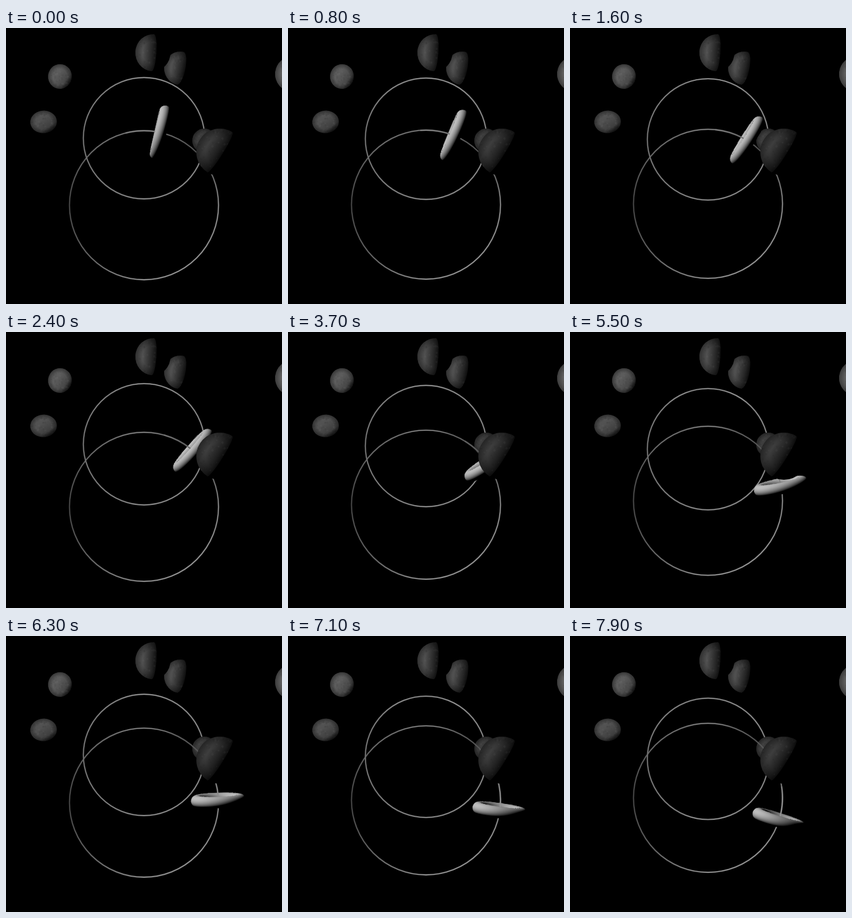
Recreate the animation shown at these times as an HTML page with a canvas. Size 480 by 480 pixels, loop 8000 ms.

```html
<!DOCTYPE html>
<html lang="en">
<head>
<meta charset="utf-8">
<title>Linked rings</title>
<style>
html, body { margin: 0; width: 100%; height: 100%; overflow: hidden; background: #000; }
canvas { display: block; }
</style>
</head>
<body>
<canvas id="stage" width="480" height="480"></canvas>
<script>
const ctx = document.getElementById('stage').getContext('2d');
const LOOP = 8000, STEP = 100, RAD = Math.PI / 180, TAU = Math.PI * 2;
const gray = (v, a = 1) => `rgba(${v},${v},${v},${a})`;

// Sphere: black disc, a lit side facing `dir` degrees, terminator bulging by `bulge`.
function moon(x, y, rx, ry, dir, bulge, bright, dim, seed) {
  ctx.save();
  ctx.translate(x, y);
  ctx.scale(1, ry / rx);
  ctx.fillStyle = '#000';
  ctx.beginPath();
  ctx.arc(0, 0, rx, 0, TAU);
  ctx.fill();
  ctx.rotate((dir + 180) * RAD);
  const fade = ctx.createLinearGradient(-rx, 0, rx * bulge, 0);
  fade.addColorStop(0, gray(bright));
  fade.addColorStop(0.35, gray(bright));
  fade.addColorStop(0.8, gray(dim));
  fade.addColorStop(1, gray(dim * 0.35));
  ctx.beginPath();
  ctx.arc(0, 0, rx, Math.PI / 2, Math.PI * 1.5);
  ctx.ellipse(0, 0, rx * bulge, rx, 0, -Math.PI / 2, Math.PI / 2);
  ctx.fillStyle = fade;
  ctx.fill();
  ctx.clip();
  const rnd = () => (seed = seed * 16807 % 2147483647) / 2147483647;
  for (let i = 0; i < 90; i++) {
    const a = rnd() * TAU, d = Math.sqrt(rnd()) * rx;
    ctx.fillStyle = gray(i % 2 ? 150 : 0, 0.06);
    ctx.beginPath();
    ctx.arc(d * Math.cos(a), d * Math.sin(a), 0.5 + rnd() * 1.7, 0, TAU);
    ctx.fill();
  }
  const limb = ctx.createRadialGradient(0, 0, rx * 0.6, 0, 0, rx);
  limb.addColorStop(0, gray(0, 0));
  limb.addColorStop(1, gray(0, 0.4));
  ctx.fillStyle = limb;
  ctx.fillRect(-rx, -rx, rx * 2, rx * 2);
  ctx.restore();
}

// Thin wire circle; tones are spread evenly clockwise from the right.
function wire(cy, r, tones, from = 0, to = TAU) {
  const shade = ctx.createConicGradient(0, 240, cy);
  tones.forEach((v, i) => shade.addColorStop(i / (tones.length - 1), gray(v)));
  ctx.strokeStyle = shade;
  for (const [width, alpha] of [[2.7, 0.45], [1.4, 1]]) {
    ctx.globalAlpha = alpha;
    ctx.lineWidth = width;
    ctx.beginPath();
    ctx.arc(240, cy, r, from, to);
    ctx.stroke();
  }
  ctx.globalAlpha = 1;
}

// Ray-marched torus: local x points outward, y along the wire, z to the viewer.
const W = 208, H = 64, R = 37.8, TUBE = 10;
const buffer = document.createElement('canvas');
buffer.width = W;
buffer.height = H;
const bctx = buffer.getContext('2d');
const image = bctx.createImageData(W, H);
const LIGHT = [-0.68, -0.6, 0.42];

function torus(cx, cy, angle, lean) {
  const sa = Math.sin(angle), ca = Math.cos(angle);
  const s = lean / R, c = Math.sqrt(1 - s * s);
  const lx = LIGHT[0] * sa - LIGHT[1] * ca, ly = LIGHT[0] * ca + LIGHT[1] * sa, lz = LIGHT[2];
  const dist = (x, y, z) => {
    const k = Math.sqrt(x * x + (y * s + z * c) ** 2) - R, b = y * c - z * s;
    return Math.sqrt(k * k + b * b) - TUBE;
  };
  // Share of light that reaches a point, with a soft shadow edge.
  const reach = (x, y, z) => {
    let open = 1;
    for (let i = 0, t = 2; i < 40 && t < 100; i++) {
      const d = dist(x + lx * t, y + ly * t, z + lz * t);
      open = Math.min(open, Math.max(0, 12 * d / t));
      if (!open) break;
      t += Math.max(d, 0.3);
    }
    return open;
  };
  image.data.fill(0);
  for (let j = 0; j < H; j++) for (let i = 0; i < W; i++) {
    const x = (i + 0.5 - W / 2) / 2, y = (j + 0.5 - H / 2) / 2;
    let z = 50, d = 1;
    for (let n = 0; n < 80 && z > -50; n++) {
      d = dist(x, y, z);
      if (d < 0.03) break;
      z -= d;
    }
    if (d > 0.1) continue;
    const w = y * s + z * c, h = Math.hypot(x, w), k = h - R, b = y * c - z * s;
    const nx = k * x / h / TUBE;
    const ny = (k * w / h * s + b * c) / TUBE;
    const nz = (k * w / h * c - b * s) / TUBE;
    let lit = Math.max(0, nx * lx + ny * ly + nz * lz);
    if (lit) lit *= 0.12 + 0.88 * reach(x + nx * 0.3, y + ny * 0.3, z + nz * 0.3);
    const p = (j * W + i) * 4;
    image.data.fill(Math.round(190 * lit ** 0.7), p, p + 3);
    image.data[p + 3] = 255;
  }
  bctx.putImageData(image, 0, 0);
  ctx.save();
  ctx.imageSmoothingQuality = 'high';
  ctx.transform(sa, -ca, ca, sa, cx, cy);
  ctx.drawImage(buffer, -W / 4, -H / 4, W / 2, H / 2);
  ctx.restore();
}

const SMALL = [145, 150, 155, 135, 125, 140, 155, 150, 145];
const LARGE = [145, 160, 163, 112, 75, 115, 135, 88, 145];

function draw(t) {
  ctx.fillStyle = '#000';
  ctx.fillRect(0, 0, 480, 480);
  moon(94, 84.5, 20.8, 21.5, 215, 0.97, 92, 70, 11);
  moon(65.5, 163.5, 23.2, 19.7, 230, 0.97, 82, 62, 23);
  moon(303, 70, 28, 29, 192, 0.32, 80, 36, 37);
  moon(255.5, 43, 30.5, 32, 184, 0.2, 80, 36, 41);
  moon(499, 80, 31, 31, 185, 0.1, 100, 60, 53);

  const smallY = 191.7 + 0.9 * t + 0.238 * t * t;
  const largeY = 308.2 - t - 0.303 * t * t;
  const angle = (12.7 + 12 * t) * RAD;
  const lean = 4 * Math.sin(Math.PI * (t + 0.6) / 11);
  const r = 129.6;

  wire(smallY, 105.5, SMALL);
  moon(345, 196, 21, 21, 212, 0.5, 62, 42, 67);
  wire(largeY, r, LARGE);
  torus(240 + r * Math.sin(angle), largeY - r * Math.cos(angle), angle, lean);
  // The wire enters the hole in front of the far rim.
  const entry = angle - Math.PI / 2 + (lean - TUBE) / r;
  wire(largeY, r, LARGE, entry - 0.4, entry);
  moon(372, 216, 41, 41, 212, 0.13, 62, 30, 79);
}

function frame(now) {
  draw(Math.floor(now % LOOP / STEP) * STEP / 1000);
  requestAnimationFrame(frame);
}
requestAnimationFrame(frame);
</script>
</body>
</html>
```
